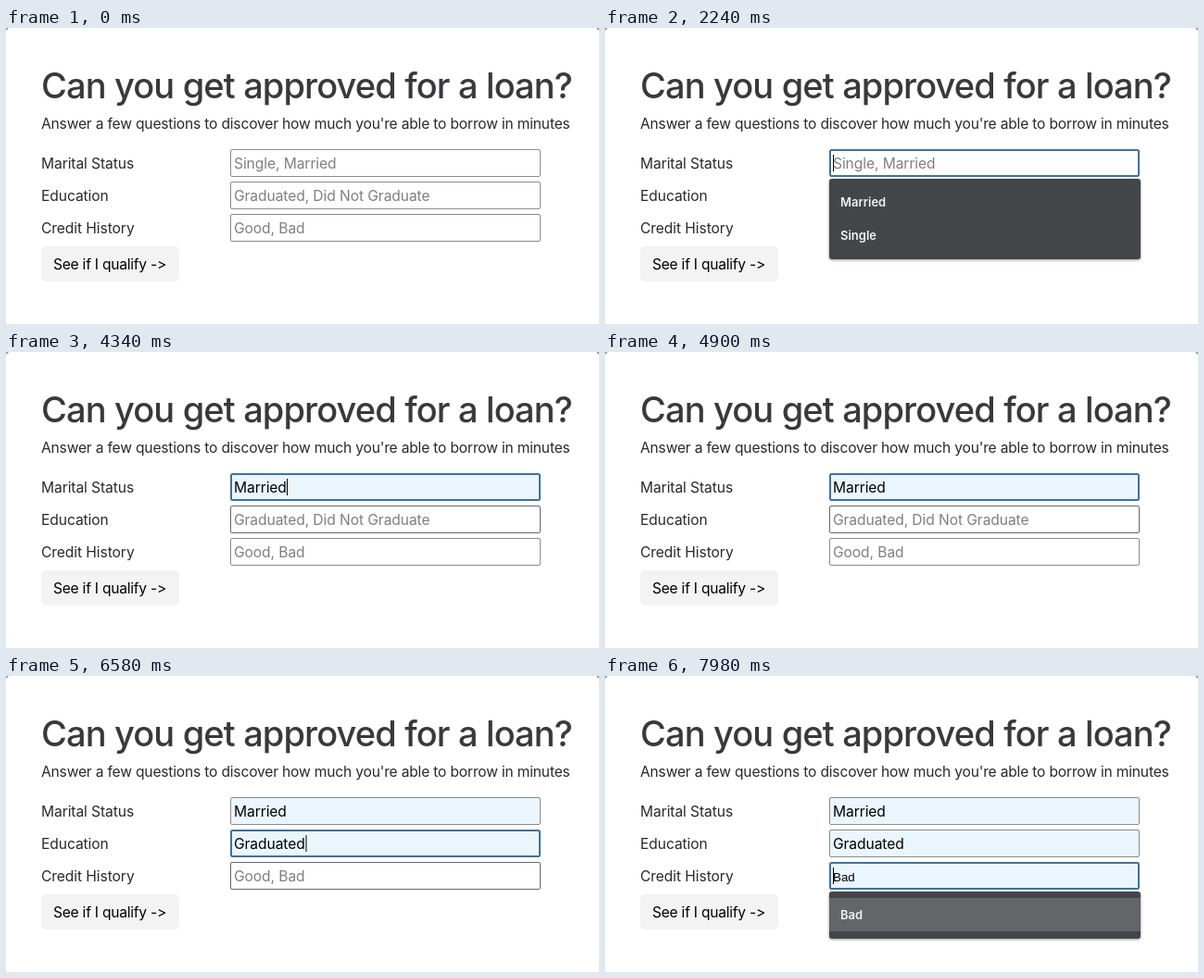
These frames come from a looping animation (640 by 320 pixels, 8 s). An HTML page:

```html
<!DOCTYPE html>
<html lang="en">
<head>
<meta charset="utf-8">
<style>
html, body { margin: 0; width: 100%; height: 100%; overflow: hidden; background: #fff; }
svg { display: block; width: 640px; height: 320px; font: 15.6px Inter, sans-serif; letter-spacing: -.08px; fill: #29292c; }
.title { font-size: 38px; font-weight: 530; letter-spacing: -.86px; fill: #39393c; }
.lead { letter-spacing: -.187px; }
.button { letter-spacing: -.24px; fill: #000; }
.hint { fill: #7f7f7f; }
.value { fill: #000; }
.preview { font: 13.33px "Liberation Sans", Arial, sans-serif; letter-spacing: 0; fill: #000; }
.item { font-size: 13px; font-weight: 600; letter-spacing: 0; fill: #f1f2f3; }
.menu { filter: drop-shadow(0 1px 1.5px #0006); }
</style>
</head>
<body>
<svg viewBox="0 0 640 320">
  <path d="M0 0h3L0 3zM640 0h-3l3 3z" fill="#999"/>
  <text class="title" x="38" y="76">Can you get approved for a loan?</text>
  <text class="lead" x="38" y="109">Answer a few questions to discover how much you're able to borrow in minutes</text>
  <rect x="38" y="236" width="149" height="38" rx="5" fill="#f3f3f3"/>
  <text class="button" x="51" y="261">See if I qualify -&gt;</text>
  <g id="form"></g>
</svg>
<script>
const LOOP = 8000;
// Times in ms: focus, hover, pick, blur; off = moments the caret blinks out.
const fields = [
  { label: 'Marital Status', hint: 'Single, Married', items: ['Married', 'Single'], end: 303,
    focus: 2100, hover: 3150, pick: 4200, blur: 5110, off: [2660, 3710, 4760] },
  { label: 'Education', hint: 'Graduated, Did Not Graduate', items: ['Graduated', 'Did Not Graduate'], end: 323.5,
    focus: 5110, hover: 5810, pick: 6580, blur: 7210, off: [5670, 6300, 7070] },
  { label: 'Credit History', hint: 'Good, Bad', items: ['Bad'], end: 275,
    focus: 7210, hover: 7910, pick: LOOP, blur: LOOP, off: [7700, LOOP, LOOP] },
];
const form = document.getElementById('form');

const text = (cls, x, y, s) => `<text class="${cls}" x="${x}" y="${y}">${s}</text>`;
const rect = (x, y, w, h, fill, more = '') =>
  `<rect x="${x}" y="${y}" width="${w}" height="${h}" fill="${fill}" ${more}/>`;

function drawField(f, i, t) {
  const y = 131 + 35 * i;
  const focused = t >= f.focus && t < f.blur;
  const phase = [f.hover, f.pick].filter(at => t >= at).length;
  const prev = fields[i - 1];
  const uncovered = prev && t >= prev.pick && t < prev.blur;
  const line = focused ? 2 : 1;
  const stroke = focused ? '#3e729c' : uncovered ? '#686868' : '#8c8c8c';
  let out = text('', 38, y + 21, f.label);
  out += rect(242 + line / 2, y + line / 2, 335 - line, 30 - line, phase ? '#ebf5fe' : '#fff',
    `rx="1.5" stroke="${stroke}" stroke-width="${line}"`);
  out += text(['hint', 'preview', 'value'][phase], 246, y + 21, phase ? f.items[0] : f.hint);
  if (focused && t < f.off[phase])
    out += rect(phase == 2 ? f.end : 246, y + 6, 1, 18, '#000');
  return out;
}

function drawMenu(f, i, t) {
  if (t < f.focus || t >= f.pick) return '';
  const y = 163 + 35 * i;
  let out = rect(242, y, 336, 15 + 36 * f.items.length, '#424649', 'rx="3" class="menu"');
  if (t >= f.hover) out += rect(242, y + 7, 336, 36, '#646569');
  f.items.forEach((s, n) => out += text('item', 254, y + 30 + 36 * n, s));
  return out;
}

let last;
function frame() {
  const t = performance.now() % LOOP;
  const html = [drawField, drawMenu].map(draw => fields.map((f, i) => draw(f, i, t)).join('')).join('');
  if (html !== last) form.innerHTML = last = html;
  requestAnimationFrame(frame);
}
frame();
</script>
</body>
</html>
```
